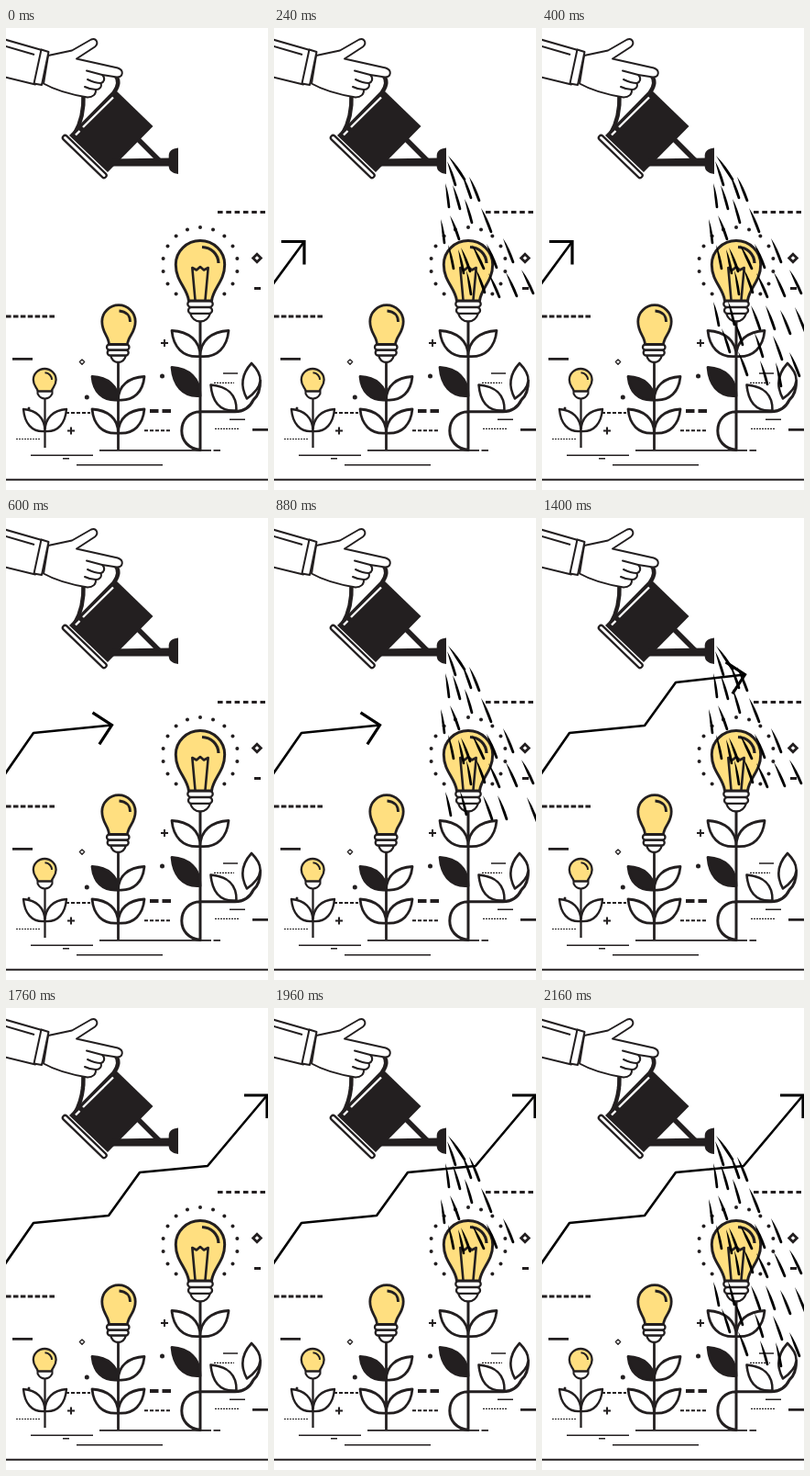
Recreate the animation shown at these times as an HTML page. Size 286x503 px, loop 2.32 s.

```html
<!DOCTYPE html>
<html lang="en">
<head>
<meta charset="utf-8">
<title>Growing ideas</title>
<style>
  html, body { margin: 0; width: 100%; height: 100%; overflow: hidden; background: #fff; }
  svg { display: block; width: 286px; height: 503px; }
  .ink { fill: none; stroke: #231f20; stroke-width: 2.8; stroke-linejoin: round; }
  .paper { fill: #fff; }
  .solid { fill: #231f20; }
  .glow { fill: #ffdf80; }
  .thin { stroke-width: 1.4; }
  .fine { stroke-width: 1.2; stroke-dasharray: 2 1; }
  .round { stroke-linecap: round; }
  .dot { fill: #231f20; stroke: none; }
</style>
</head>
<body>
<svg viewBox="0 0 286 503">
  <g class="ink">
    <!-- ground and scattered marks -->
    <path stroke-width="2" d="M0 491.7H286"/>
    <path class="thin" d="M27 465.2H95M62 468.7H69M77 475.7H171M237 376H253M244 426.3H261"/>
    <path stroke-width="1.8" d="M102 459.8H224M226.500 459.800H234"/>
    <path d="M7 360.300H29M271 283.500H278M269 437.300H286"/>
    <path stroke-dasharray="5.600 3.700" d="M231 200.500H283"/>
    <path stroke-dasharray="5.600 2.300" d="M0 314H53"/>
    <path stroke-width="4" d="M157 417H166.500M170.500 417H180"/>
    <path stroke-width="2" stroke-dasharray="4 2" d="M59 419H92M151 438.300H179"/>
    <path class="fine" d="M11 447.500H37M227 386.300H249M228 436.300H254"/>
    <path stroke-width="2" d="M169 343H177M173 339V347M67 438.500H75M71 434.500V442.500"/>
    <path class="thin" d="M244.500 414H250M247.200 411V417"/>
    <path stroke-linejoin="miter" d="M274 246.300L278.300 250.500L274 254.700L269.700 250.500Z"/>
    <path class="thin" d="M83 361L85.600 363.600L83 366.200L80.400 363.600Z"/>
    <g class="dot">
      <circle cx="170.500" cy="379" r="2.500"/><circle cx="88.300" cy="402" r="2.500"/>
      <circle cx="25" cy="414" r="1.500"/>
    </g>
    <g id="rays" class="dot"></g>

    <!-- small plant -->
    <path stroke-width="2.300" d="M42.500 403V457"/>
    <g id="leaves1" stroke-width="2.400"></g>
    <path class="paper" stroke-width="2" d="M34.500 394.500H50.500V398Q48 403.500 42.500 403.500Q37 403.500 34.500 398Z"/>
    <path class="glow" stroke-width="2.300" d="M35 395.500C33.500 391 29.800 389.500 29.800 383A12.400 12 0 0 1 54.600 383C54.600 389.500 51 391 49.500 395.500Z"/>
    <path stroke-width="2" d="M42.500 375.300C47 375.500 50 379 50 383"/>

    <!-- middle plant -->
    <path d="M122.500 363V460"/>
    <g id="leaves2"></g>
    <g class="paper" stroke-width="2.300">
      <path d="M114 356H131Q129 364 122.500 364Q116 364 114 356Z"/>
      <rect x="110.700" y="350.500" width="23" height="6" rx="3"/>
      <rect x="110" y="344.500" width="24.500" height="6" rx="3"/>
    </g>
    <path class="glow" d="M112.500 344.500C112 335 104.800 332 104.800 319.500A18.200 17.800 0 0 1 141.200 319.500C141.200 332 133.500 335 132.500 344.500Z"/>
    <path d="M123.500 308C131 308.500 135.500 313 135.500 320"/>

    <!-- tall plant -->
    <path stroke-width="3" d="M212 318V459.500C199 458 191.800 449 191.800 438.500C191.800 427 200 417.800 212 417.800H250Q264 417.500 270 405Q278 398 277.500 383"/>
    <g id="leaves3"></g>
    <path class="paper" stroke-width="2.600" d="M263 403.500C255 389 257 377 268 365C281 378 282 390 263 403.500Z"/>
    <path class="paper" stroke-width="2.600" d="M251.500 416.500C233 418 225 406 223.500 388.500C241 390 252 399 251.500 416.500Z"/>
    <g class="paper" stroke-width="2.300">
      <path d="M201 310.500H223Q220 319.500 212 319.500Q204 319.500 201 310.500Z"/>
      <rect x="199" y="304" width="26" height="6.800" rx="3.400"/>
      <rect x="198.300" y="297" width="27.400" height="6.800" rx="3.400"/>
    </g>
    <path class="glow" stroke-width="3" d="M199.500 297C198 283 185.300 276 185.300 257.500A26.700 26 0 0 1 238.700 257.500C238.700 276 226 283 224.500 297Z"/>
    <path stroke-width="2.600" d="M206.500 296L203.300 261L208 263.500L212 260L216 263.500L220.700 261L217.500 296"/>
    <path stroke-width="3.200" d="M214 238.500C224 239 231.500 246 232 256"/>

    <!-- watering can -->
    <path stroke-width="4.500" d="M84.500 72Q85.500 97 75 115"/>
    <path stroke-width="4.500" d="M119 51Q126 59 118 70"/>
    <path class="solid" stroke="none" d="M118.500 66.500L160.500 107L111 157L69 117Z"/>
    <path stroke-width="5.500" d="M144 121L169 146"/>
    <path class="solid" stroke="none" d="M116 142.500L179 141.500V150.500H116Z"/>
    <path class="solid" stroke="none" d="M188 130.500C181 131.500 177.700 134 177.700 139V150.500C177.700 155 181 158 188 159Z"/>
    <path stroke="#fff" stroke-width="2.400" d="M117 75.500L84 108M80.500 112L76 116.500"/>
    <path class="round" stroke-width="7.500" d="M64.500 119.500L107 160.500"/>
    <path class="round" stroke="#fff" stroke-width="3" d="M64.500 119.500L107 160.500"/>

    <!-- hand and sleeve -->
    <path class="paper" stroke-width="2" d="M-3 12L39 24L32 61.500L-3 53"/>
    <path stroke-width="2" d="M-2 19.500L31 29"/>
    <path class="paper" stroke-width="2" d="M46 30L72 24.500L93 12.500C99 10.500 101.500 17 97 20.500L77 33.500L122 43.500C129 46 128 53.500 121 53.500L105 51C109 55 107 59 103.500 60C105 64 102 67.500 98 67C98.500 72 95 75.500 89 75.500C74 73 56 69 41 60.500Z"/>
    <path class="round" stroke-width="2" d="M88 46.500L105 51M89 56Q97 60 103.500 60M86 64Q92 67 98 67"/>
    <path class="paper" stroke-width="2" d="M38.500 23.500L46.500 26L39 62L30.500 60.500Z"/>
  </g>
  <g id="water" fill="#000"></g>
  <g fill="none" stroke="#000">
    <path id="line" stroke-width="2.600" stroke-linejoin="round"/>
    <path id="head" stroke-width="3.200"/>
  </g>
</svg>
<script>
  const NS = 'http://www.w3.org/2000/svg';
  const LOOP = 2320, POUR = LOOP / 4, HOP = LOOP / 6;
  const $ = id => document.getElementById(id);

  function add(parent, tag, attrs) {
    const el = document.createElementNS(NS, tag);
    for (const k in attrs) el.setAttribute(k, attrs[k]);
    return parent.appendChild(el);
  }

  // Leaf from its stem joint (x, y) to a tip offset by (w, -h).
  function leaf(parent, x, y, w, h, solid) {
    add(parent, 'path', {
      class: solid ? 'solid' : 'paper',
      d: `M${x} ${y}c${w * .62} ${h * .06} ${w * .95} ${-h * .38} ${w} ${-h}` +
         `c${-w * .6} ${h * .04} ${-w} ${h * .38} ${-w} ${h}Z`
    });
  }
  for (const side of [-1, 1]) {
    leaf($('leaves1'), 42.5, 439, side * 23.5, 24);
    leaf($('leaves2'), 122.5, 441, side * 28.5, 26);
    leaf($('leaves2'), 122.5, 405, side * 28.5, 25.5, side < 0);
    leaf($('leaves3'), 212, 357.5, side * 31, 28);
  }
  leaf($('leaves3'), 212, 400.5, -31, 31, true);

  for (let i = -7; i <= 7; i++) {
    const a = i * Math.PI / 9;
    add($('rays'), 'circle', { cx: 212 + 41 * Math.sin(a), cy: 258 - 41 * Math.cos(a), r: 2 });
  }

  // Each drop: top x, top y, sideways drift.
  const FALL = 26;
  const drops = [
    [190, 139, 18], [189, 145, 9], [205, 159, 10], [213, 162, 11], [187, 169, 4],
    [195, 171, 8], [208, 186, 8], [226, 196, 11], [192, 204, 10], [182, 208, 4],
    [250, 229, 11], [190, 236, 6], [216, 236, 13], [232, 235, 11], [204, 239, 10],
    [201, 241, 6], [210, 264, 5], [220, 262, 10], [234, 267, 12], [253, 266, 12],
    [270, 263, 13], [187, 298, 6], [203, 297, 7], [228, 302, 10], [244, 302, 10],
    [260, 307, 11], [276, 304, 11], [210, 319, 9], [196, 327, 9], [232, 332, 9],
    [252, 335, 10], [214, 352, 10], [270, 353, 11], [238, 362, 8], [255, 364, 6]
  ].map(([x, y, dx]) => ({
    end: y + FALL,
    el: add($('water'), 'path', {
      d: `M${x} ${y}q${dx / 2 + 2} ${FALL / 2 - 2} ${dx + 1.3} ${FALL - .5}` +
         `a1.4 1.4 0 0 1 -2.6 1Q${x + dx / 2 - 1} ${y + FALL / 2 + 1} ${x} ${y}Z`
    })
  }));

  const bends = [[-2, 280], [30, 234], [112, 226], [146, 179], [220, 172], [284, 96]];
  // Arrow tip and heading in degrees at each stage.
  const tips = [null, [33, 232.5, -45], [115.5, 225.5, -12], [148, 178, -57], [221.5, 170.5, -12], [285, 95, -45]];

  function barb(x, y, deg) {
    const a = deg * Math.PI / 180;
    return `${x - 25 * Math.cos(a)} ${y - 25 * Math.sin(a)}`;
  }

  function drawArrow(stage) {
    if (!stage) {
      $('line').setAttribute('d', '');
      $('head').setAttribute('d', '');
      return;
    }
    const [x, y, deg] = tips[stage];
    $('line').setAttribute('d', 'M' + [...bends.slice(0, stage), [x, y]].join('L'));
    $('head').setAttribute('d', `M${barb(x, y, deg + 45)}L${x} ${y}L${barb(x, y, deg - 45)}`);
  }

  let shown = -1;
  const start = performance.now();
  function frame() {
    const t = (performance.now() - start) % LOOP;
    const front = 148 + .61 * (t % POUR);
    for (const d of drops) d.el.style.display = d.end <= front ? '' : 'none';
    const stage = Math.min(5, Math.floor((t + 226) / HOP));
    if (stage !== shown) drawArrow(shown = stage);
    requestAnimationFrame(frame);
  }
  frame();
</script>
</body>
</html>
```
